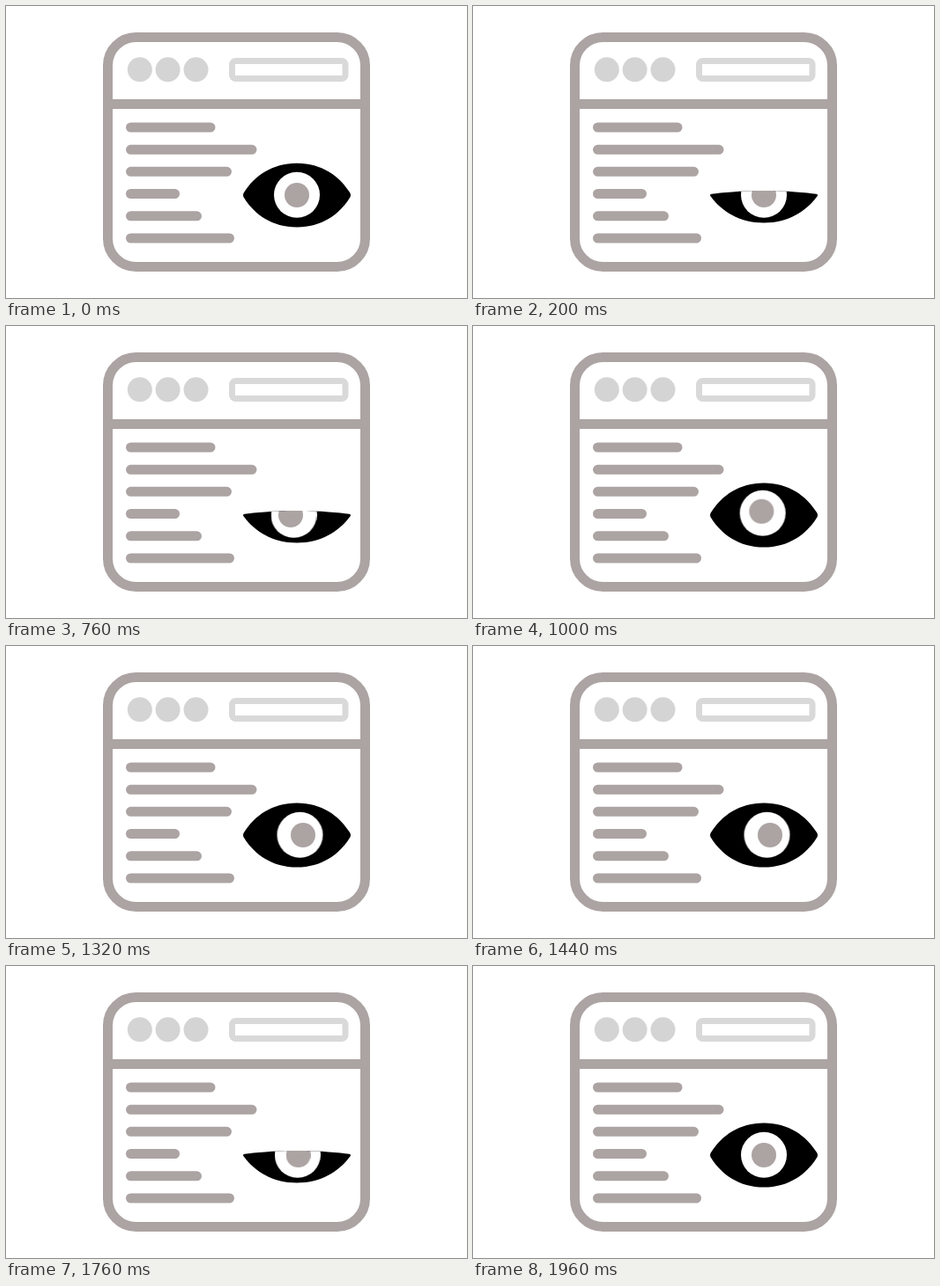
These frames come from a looping animation (523x332 px, 2.2 s). An HTML page:

```html
<!DOCTYPE html>
<html lang="en">
<head>
<meta charset="utf-8">
<title>Watching window</title>
<style>
  html, body { margin: 0; width: 100%; height: 100%; overflow: hidden; background: #fff; }
  svg { display: block; width: 523px; height: 332px; }

  .frame { fill: none; stroke: #aca3a3; stroke-width: 11; stroke-linecap: round; }
  .dots { fill: #d4d4d4; }
  .bar { fill: none; stroke: #d9d9d9; stroke-width: 7; }
  .iris { fill: #aca3a3; }

  .lids, .gaze-x, .gaze-y { animation: 2200ms linear infinite; }
  .lids { animation-name: blink; }
  .gaze-x { animation-name: look-x; }
  .gaze-y { animation-name: look-y; }

  /* --k scales the gaze: the white follows at half the distance of the iris */
  .white { --k: .5; }
  .iris { --k: 1; }

  /* three blinks of 400 ms */
  @keyframes blink {
    0%, 25.455%, 70.909% {
      d: path("M269 215Q269 213 270.5 211.3C282 193 302 178.5 330 178.5S378 193 389.5 211.3Q391 213 391 215Q391 217 389.5 218.7C378 237 358 251.5 330 251.5S282 237 270.5 218.7Q269 217 269 215Z");
      animation-timing-function: cubic-bezier(.39, .575, .565, 1);
    }
    9.091%, 34.545%, 80% {
      d: path("M269 215Q269 214 270.5 213.8C282 212.4 302 210 330 210S378 212.4 389.5 213.8Q391 214 391 215Q391 216 389.5 217.5C378 233 358 246.5 330 246.5S282 233 270.5 217.5Q269 216 269 215Z");
      animation-timing-function: cubic-bezier(.47, 0, .745, .715);
    }
    18.182%, 43.636%, 89.091%, 100% {
      d: path("M269 215Q269 213 270.5 211.3C282 193 302 178.5 330 178.5S378 193 389.5 211.3Q391 213 391 215Q391 217 389.5 218.7C378 237 358 251.5 330 251.5S282 237 270.5 218.7Q269 217 269 215Z");
    }
  }

  /* left, over the top to the right, back to the centre */
  @keyframes look-x {
    0%, 23.636% { transform: translateX(0); animation-timing-function: ease-in-out; }
    34.545%, 36.364% { transform: translateX(calc(var(--k) * -7px)); animation-timing-function: ease-in-out; }
    60%, 72.727% { transform: translateX(calc(var(--k) * 7px)); animation-timing-function: ease-in-out; }
    83.636%, 100% { transform: translateX(0); }
  }
  @keyframes look-y {
    0%, 36.364% { transform: translateY(0); animation-timing-function: ease-in-out; }
    48.182% { transform: translateY(calc(var(--k) * -4.7px)); animation-timing-function: ease-in-out; }
    60%, 100% { transform: translateY(0); }
  }
</style>
</head>
<body>
<svg viewBox="0 0 523 332">
  <defs>
    <clipPath id="lids">
      <path class="lids" d="M269 215Q269 213 270.5 211.3C282 193 302 178.5 330 178.5S378 193 389.5 211.3Q391 213 391 215Q391 217 389.5 218.7C378 237 358 251.5 330 251.5S282 237 270.5 218.7Q269 217 269 215Z"/>
    </clipPath>
  </defs>

  <g class="frame">
    <rect x="115.5" y="35.5" width="292" height="261" rx="32"/>
    <path d="M116 111.5H406"/>
    <path d="M141.5 138H232M141.5 163.3H279M141.5 188.3H250.5M141.5 213.5H191.5M141.5 238.8H216.5M141.5 264H253.5"/>
  </g>

  <g class="dots">
    <circle cx="151.8" cy="72.3" r="14"/>
    <circle cx="183.6" cy="72.3" r="14"/>
    <circle cx="215.5" cy="72.3" r="14"/>
  </g>
  <rect class="bar" x="256.5" y="62.5" width="128.5" height="20" rx="4"/>

  <g clip-path="url(#lids)">
    <rect x="260" y="170" width="140" height="90"/>
    <g class="white" fill="#fff">
      <g class="gaze-x"><circle class="gaze-y" cx="330" cy="214.8" r="26"/></g>
    </g>
    <g class="iris">
      <g class="gaze-x"><circle class="gaze-y" cx="330" cy="215" r="14"/></g>
    </g>
  </g>
</svg>
</body>
</html>
```
